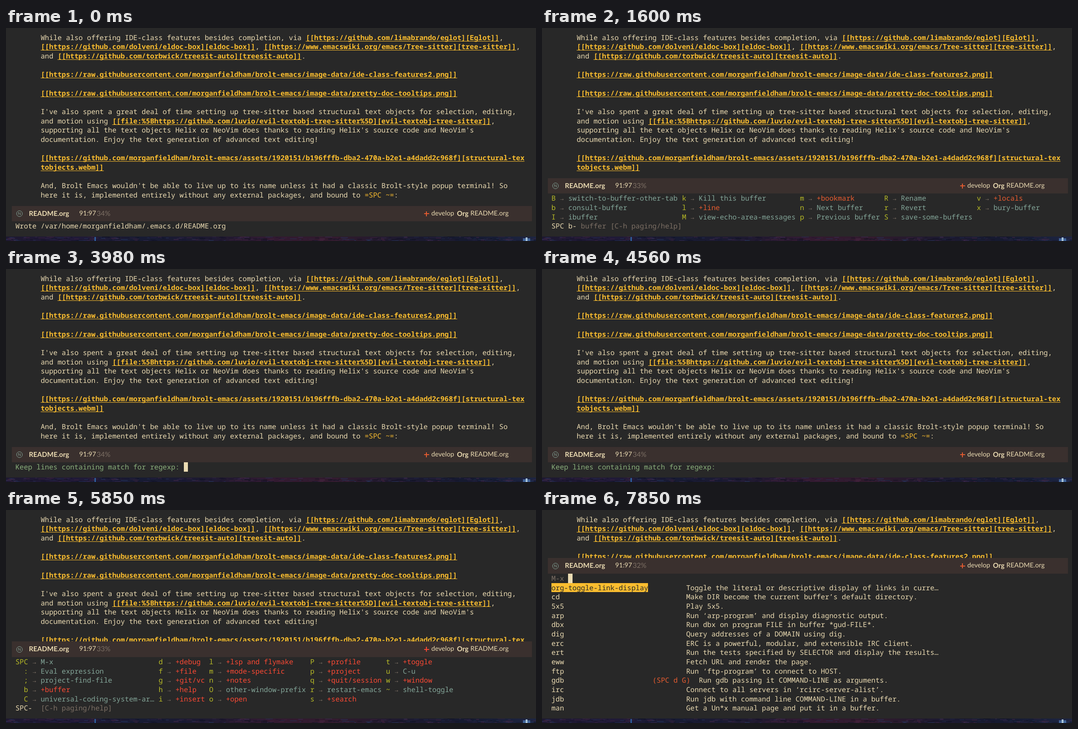
An HTML page with a canvas for the animation above (8000 ms loop, 1180 by 475 pixels).

```html
<!DOCTYPE html>
<html lang="en">
<head>
<meta charset="utf-8">
<style>
  :root { --w: 9.375px; --row: 20.65px; }
  html, body { margin: 0; width: 100%; height: 100%; overflow: hidden; background: #282828; }
  #stage { position: relative; width: 1180px; height: 475px; overflow: hidden; background: #282828;
    color: #ebdbb2; text-rendering: geometricPrecision; }
  pre { position: absolute; margin: 0; font: 15.625px/var(--row) "Noto Sans Mono", monospace;
    font-variant-ligatures: none; }
  #text { left: 77.25px; top: 10.7px; }
  u { color: #fabd2f; font-weight: 700; text-decoration: underline 1px; text-underline-offset: 2px;
    text-decoration-skip-ink: none; }
  #panel { position: absolute; left: 0; width: 1180px; height: 475px; background: #282828; }
  #mode { position: absolute; left: 13px; top: 0; width: 1158px; height: 34.7px; background: #3a302e;
    font: 14.6px/34.7px Lato, sans-serif; }
  #mode > * { position: absolute; white-space: pre; }
  #mode b { font-size: 15.2px; }
  #state { left: 10px; top: 10.5px; width: 12px; height: 12px; border: 1px solid #83a598; border-radius: 50%;
    color: #83a598; font-size: 9px; line-height: 12px; text-align: center; }
  #percent { color: #7c6f64; font-size: 15.6px; }
  #plus { left: 917.5px; top: 12px; width: 11px; height: 11px;
    background: linear-gradient(var(--red) 0 0) center / 11px 2px no-repeat,
                linear-gradient(var(--red) 0 0) center / 2px 11px no-repeat; }
  #list { position: absolute; left: 21px; top: 34.7px; }
  .key { color: #b8bb26; }
  .dim { color: #7c6f64; }
  .cmd { color: #83a598; }
  .red { color: var(--red); }
  .gold { color: #fabd2f; }
  .ask { color: #8bb07c; }
  .pick { background: #fabd2f; color: #282828; }
  .pick, .cursor { display: inline-block; height: var(--row); vertical-align: top; }
  .cursor { width: var(--w); background: #ebdbb2; }
  canvas { position: absolute; left: 0; top: 465px; }
</style>
</head>
<body>
<div id="stage">
<pre id="text"></pre>
<div id="panel">
  <div id="mode">
    <span id="state">N</span>
    <b style="left:38px">README.org</b>
    <span style="left:150px">91:97</span>
    <span id="percent" style="left:189px"></span>
    <span id="plus"></span>
    <span style="left:934px">develop</span>
    <b style="left:991px">Org</b>
    <span style="left:1021px">README.org</span>
  </div>
  <div id="list"></div>
</div>
<canvas id="wall" width="1180" height="10"></canvas>
</div>
<script>
const $ = id => document.getElementById(id);
const tag = (name, s) => `<span class="${name}">${s}</span>`;
const block = (s, col = 0, row = 0) =>
  `<pre style="left:calc(${col} * var(--w));top:calc(${row} * var(--row))">${s}</pre>`;
const cursor = tag('cursor', '');

const doc = `While also offering IDE-class features besides completion, via [[https://github.com/limabrando/eglot][Eglot]],
[[https://github.com/dolveni/eldoc-box][eldoc-box]], [[https://www.emacswiki.org/emacs/Tree-sitter][tree-sitter]],
and [[https://github.com/torbwick/treesit-auto][treesit-auto]].

[[https://raw.githubusercontent.com/morganfieldham/brolt-emacs/image-data/ide-class-features2.png]]

[[https://raw.githubusercontent.com/morganfieldham/brolt-emacs/image-data/pretty-doc-tooltips.png]]

I've also spent a great deal of time setting up tree-sitter based structural text objects for selection, editing,
and motion using [[file:%5Bhttps://github.com/luvio/evil-textobj-tree-sitter%5D][evil-textobj-tree-sitter]],
supporting all the text objects Helix or NeoVim does thanks to reading Helix's source code and NeoVim's
documentation. Enjoy the text generation of advanced text editing!

[[https://github.com/morganfieldham/brolt-emacs/assets/1920151/b196fffb-dba2-470a-b2e1-a4dadd2c968f][structural-tex
tobjects.webm]]

And, Brolt Emacs wouldn't be able to live up to its name unless it had a classic Brolt-style popup terminal! So
here it is, implemented entirely without any external packages, and bound to =SPC ~=:`;
$('text').innerHTML = doc.replace(/\[\[[^]*?\]\]/g, '<u>$&</u>').replace('=SPC ~=', tag('gold', '$&'));

// Each column is [grid column, "key label|key label|..."].
function keys(columns, prompt, hint) {
  const lists = columns.map(([col, s]) => [col, s.split('|')]);
  const rows = lists[0][1].length;
  const html = lists.map(([col, items]) => {
    const width = Math.max(...items.map(s => s.indexOf(' ')));
    return block(items.map(s => {
      const cut = s.indexOf(' '), label = s.slice(cut + 1);
      return tag('key', s.slice(0, cut).padStart(width)) + tag('dim', ' → ') +
        tag(label[0] == '+' ? 'red' : 'cmd', label);
    }).join('\n'), col);
  }).join('');
  return { rows, html: html + block(prompt + tag('dim', hint + ' [C-h paging/help]'), 0, rows) };
}

const wrote = { rows: 0, html: block('Wrote /var/home/morganfieldham/.emacs.d/README.org'), pct: 34 };
const idle = { rows: 0, html: '', pct: 34 };
const ask = { rows: 0, html: block(tag('ask', 'Keep lines containing match for regexp:')), pct: 34 };
const askOn = { ...ask, html: ask.html + block(cursor, 40) };

const leader = { ...keys([
  [0, 'SPC M-x|: Eval expression|; project-find-file|b +buffer|C universal-coding-system-ar…'],
  [34, 'd +debug|f +file|g +git/vc|h +help|i +insert'],
  [46, 'l +lsp and flymake|m +mode-specific|n +notes|O other-window-prefix|o +open'],
  [70, 'P +profile|p +project|q +quit/session|r restart-emacs|s +search'],
  [88, 't +toggle|u C-u|w +window|~ shell-toggle']
], 'SPC- ', ''), pct: 33, red: '#fb4934' };

const buffer = { ...keys([
  [0, 'B switch-to-buffer-other-tab|b consult-buffer|I ibuffer'],
  [31, 'k Kill this buffer|l +line|M view-echo-area-messages'],
  [59, 'm +bookmark|n Next buffer|p Previous buffer'],
  [79, 'R Rename|r Revert|S save-some-buffers'],
  [101, 'v +locals|x bury-buffer']
], 'SPC b-', ' buffer'), pct: 33 };

const line = { ...keys([[0, 'k keep-lines']], 'SPC b l-', ' line'), pct: 34 };

const commands = `org-toggle-link-display|Toggle the literal or descriptive display of links in curre…
cd|Make DIR become the current buffer’s default directory.
5x5|Play 5x5.
arp|Run ‘arp-program’ and display diagnostic output.
dbx|Run dbx on program FILE in buffer *gud-FILE*.
dig|Query addresses of a DOMAIN using dig.
erc|ERC is a powerful, modular, and extensible IRC client.
ert|Run the tests specified by SELECTOR and display the results…
eww|Fetch URL and render the page.
ftp|Run ‘ftp-program’ to connect to HOST.
gdb|Run gdb passing it COMMAND-LINE as arguments.
irc|Connect to all servers in ‘rcirc-server-alist’.
jdb|Run jdb with command line COMMAND-LINE in a buffer.
man|Get a Un*x manual page and put it in a buffer.`.split('\n').map(s => s.split('|'));

const palette = {
  rows: commands.length, pct: 32,
  html: block(tag('dim', 'M-x ') + cursor) + commands.map(([name, help], i) =>
    block(i ? name : tag('pick', name), 0, i + 1) +
    (name == 'gdb' ? block(tag('red', '(SPC d G)'), 24, i + 1) : '') +
    block(help, name == 'gdb' ? 35 : 32, i + 1)).join('')
};

const timeline = [[0, wrote], [480, leader], [1520, buffer], [2770, line], [3980, askOn], [4560, ask],
  [5060, askOn], [5270, idle], [5730, leader], [7770, palette]];

function paintWall() {
  const g = $('wall').getContext('2d');
  const shade = g.createLinearGradient(0, 0, 1180, 0);
  ['#1d1830', '#211a38', '#171b33', '#1d1a31', '#321a31', '#301a2c', '#1d1a30', '#151a30', '#1d2542']
    .forEach((c, i) => shade.addColorStop(i / 8, c));
  g.fillStyle = shade;
  g.fillRect(0, 0, 1180, 10);
  let seed = 7;
  const rnd = () => (seed = seed * 16807 % 2147483647) / 2147483647;
  const tints = ['#0d1020', '#3c2c52', '#4a2744', '#26365c', '#15132a'];
  for (let i = 0; i < 330; i++) {
    g.globalAlpha = .3 + rnd() * .4;
    g.fillStyle = tints[Math.floor(rnd() * tints.length)];
    g.fillRect(rnd() * 1180, rnd() * 10, 3 + rnd() * 14, 1 + rnd());
  }
  g.globalAlpha = 1;
  g.fillStyle = '#2f5f9c';
  g.fillRect(197, 1, 3, 9);
  g.fillStyle = '#41659a';
  g.fillRect(1151, 4, 16, 6);
  g.fillStyle = '#a9c4d8';
  g.fillRect(1157, 2, 4, 8);
}
paintWall();

let shown;
function draw(now) {
  const t = now % 8000;
  const scene = timeline.findLast(([at]) => at <= t)[1];
  if (scene != shown) {
    shown = scene;
    $('panel').style.top = 396.5 - 20.65 * scene.rows + 'px';
    $('stage').style.setProperty('--red', scene.red || '#e85c30');
    $('percent').textContent = scene.pct + '%';
    $('list').innerHTML = scene.html;
  }
  requestAnimationFrame(draw);
}
draw(performance.now());
</script>
</body>
</html>
```
